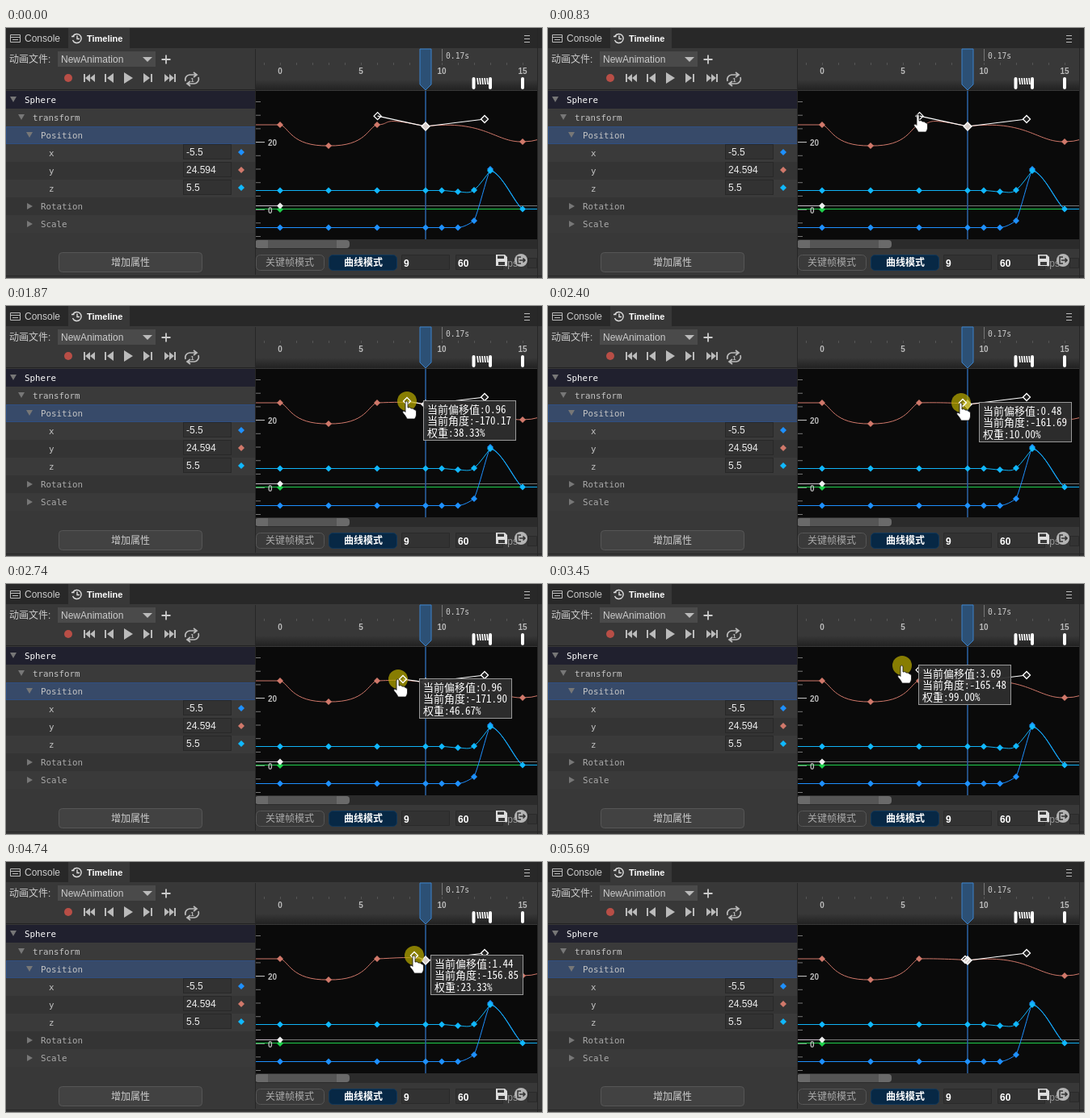
Recreate the animation shown at these times as an HTML page. Size 663 by 310 pixels, loop 6.02 s.

```html
<!DOCTYPE html>
<html lang="zh">
<head>
<meta charset="utf-8">
<title>Timeline</title>
<style>
  html, body { margin: 0; width: 100%; height: 100%; overflow: hidden; background: #383838; }
  svg { display: block; width: 663px; height: 310px; }
  text { font: 12px "Liberation Sans", "Noto Sans CJK SC", Arial, sans-serif; fill: #ccc; white-space: pre; }
  text.mid { text-anchor: middle; }
  text.value { fill: #eee; }
  text.bold { font-weight: bold; fill: #fff; }
  text.small { font-size: 10px; font-weight: bold; fill: #bbb; }
  text.label { font: 10.8px "DejaVu Sans Mono", monospace; }
  #tip text { font: 13px "Noto Sans Mono CJK SC", "Liberation Mono", monospace; fill: #fff; }
  .line { fill: none; }
</style>
</head>
<body>
<svg viewBox="0 0 663 310">
  <defs>
    <clipPath id="chart"><path d="M309 78H657V262H309z"/></clipPath>
    <linearGradient id="shade" x2="0" y2="1"><stop stop-color="#383838"/><stop offset="1" stop-color="#222"/></linearGradient>
  </defs>

  <!-- tabs -->
  <path d="M0 0H663V25H0z" fill="#282828"/>
  <path d="M77 0H153V26H77z" fill="#383838"/>
  <path d="M5.500 8.500h12v9h-12zM5.500 11.500h12M8 14.500h7" fill="none" stroke="#bbb"/>
  <text x="23" y="17">Console</text>
  <path d="M83 10a5.500 5.500 0 1 1-.5 5M81 10.500h3.500M88 9.500v4h3" fill="none" stroke="#ddd" stroke-width="1.400"/>
  <text class="bold" x="100" y="17" style="font-size:11px">Timeline</text>
  <path d="M641 9.500h7M641 13.500h7M641 17.500h7" stroke="#bbb"/>

  <!-- file picker and transport -->
  <text x="4" y="43">动画文件:</text>
  <path d="M64 29H185V48H64z" fill="#4a4a4a"/>
  <text x="68" y="43">NewAnimation</text>
  <path d="M169 36h12l-6 6z" fill="#bbb"/>
  <path d="M192.500 39h11M198 33.500v11" stroke="#ccc" stroke-width="1.800"/>
  <circle cx="77" cy="62" r="5" fill="#b84e46"/>
  <g fill="#bbb">
    <path id="skip" d="M96 57h2v10h-2zM104 57v10l-6-5zM110 57v10l-6-5z"/>
    <path id="step" d="M122 57h2v10h-2zM133 56v12l-8-6z"/>
    <path d="M146 55v14l11-7z"/>
    <use href="#step" transform="matrix(-1 0 0 1 303 0)"/>
    <use href="#skip" transform="matrix(-1 0 0 1 306 0)"/>
  </g>
  <path d="M222 66a6 6 0 0 1 5-8h8M238 61a6 6 0 0 1-5 8h-8M232 55l4 3-4 3M228 66l-4 3 4 3" fill="none" stroke="#bbb" stroke-width="1.700"/>
  <text class="small mid" x="230.500" y="67" style="font-size:8px">1</text>

  <g id="tree"></g>
  <path d="M0 76.500H309" stroke="#222"/>

  <!-- ruler -->
  <path d="M309 26H657V77H309z" fill="#383838"/>
  <path d="M309 64H657V77H309z" fill="url(#shade)"/>
  <g id="ruler"></g>
  <path d="M539.500 26v15" stroke="#777"/>
  <text class="label" x="544" y="38" style="font-size:9.700px">0.17s</text>

  <!-- curves -->
  <path d="M309 78H657V262H309z" fill="#0a0a0a"/>
  <g id="axis"></g>
  <g clip-path="url(#chart)">
    <path d="M309 220.500H657" stroke="#777"/>
    <path d="M309 220.500H339" stroke="#c8bcc8"/>
    <path d="M309 224.500H657" stroke="#1fd04c" stroke-width="1.200"/>
    <path class="line" stroke="#1e90ff" d="M309 247.500H559C566 247 573 243 579 239C586 222 593 190 599 175C616 184 630 218 639 224.500H657"/>
    <path class="line" stroke="#10b4f8" d="M309 201.500H539C546 201.500 552 203 559 203S573 206 579 201C587 194 593 184 599 177C614 180 628 217 639 224.500H657"/>
    <path id="red" class="line" stroke="#d0786a"/>
    <path d="M519 78V262" stroke="#2a5f9e" stroke-width="1.600"/>
    <g id="keys"></g>
    <path id="tangent" fill="none" stroke="#fff" stroke-width="1.200"/>
    <g id="handles"></g>
  </g>
  <text class="small" x="324" y="146">20</text>
  <text class="small" x="324" y="230">0</text>
  <path d="M512 26h14v44l-7 7-7-7z" fill="#2c5075" stroke="#3a82cc"/>

  <!-- footer -->
  <path d="M309 262H657V274H309z" fill="#2b2b2b"/>
  <rect x="308" y="263" width="117" height="10" rx="4" fill="#6a6a6a"/>
  <path d="M324 263H409V273H324z" fill="#555"/>
  <g stroke="#565656">
    <rect x="65.500" y="278.500" width="177" height="24" rx="4" fill="#424242"/>
    <rect x="309.500" y="281.500" width="84" height="19" rx="5" fill="#3a3a3a"/>
    <rect x="399.500" y="281.500" width="84" height="19" rx="5" fill="#072845" stroke="#12385a"/>
    <path d="M489.500 281.500h59v18h-59zM556.500 281.500h58v18h-58z" fill="#323232" stroke="#2a2a2a"/>
  </g>
  <text class="mid" x="154" y="294.500">增加属性</text>
  <text class="mid" x="351" y="295" style="fill:#aaa">关键帧模式</text>
  <text class="mid bold" x="442" y="295">曲线模式</text>
  <text class="bold" x="492" y="296">9</text>
  <text class="bold" x="559" y="296">60</text>
  <text x="617" y="296" style="fill:#999">fps</text>
  <path d="M645.500 285.500h11v12h-11z" fill="#333" stroke="#2a2a2a"/>
  <path d="M606 281h11l3 3v11h-14z" fill="#ddd"/>
  <path d="M608 282.500h8v3.500h-8zM609 290h8v4h-8z" fill="#383838"/>
  <circle cx="637" cy="288" r="8" fill="#b4b4b4"/>
  <path d="M637 284h-4v8h4M635 288h7M639.500 285.500l2.500 2.500-2.500 2.500" fill="none" stroke="#333" stroke-width="1.500"/>
  <path d="M308.500 26V306M657.500 0V310M0 307.500H663" stroke="#262626"/>

  <!-- pointer and value tip -->
  <circle id="press" r="12" fill="#b8aa00" fill-opacity=".72"/>
  <path id="grip" fill="none" stroke="#fff" stroke-width="1.300"/>
  <g id="tip">
    <rect x=".5" y=".5" width="114" height="49" fill="#2e2e2e" fill-opacity=".94" stroke="#999"/>
    <text x="5" y="15.500"></text><text x="5" y="30"></text><text x="5" y="45"></text>
  </g>
  <path id="hand" d="M-2 2q0-2 1.500-2t1.500 2v6q3-1 4 1 3-.5 4 1.500 2.500 0 2.500 2.500v4q0 2-2 5H0q-1-3-5-7.500-1-2 1-2.500 1 0 2 1.500z" fill="#fff" stroke="#111" stroke-width=".8"/>
</svg>
<script>
const $ = id => document.getElementById(id);
const BLUE = '#1e90ff', SKY = '#10b8ff', RED = '#d0786a';
const LOOP = 6020, ENTER = 130, PRESS = 980, RELEASE = 5480, LEAVE = 5690;
const KEY = { x: 519, y: 121.9855 }, SPAN = 60, UNITS_PER_PX = 0.24;

const rhomb = (x, y, r) => `M${x - r} ${y}L${x} ${y - r}L${x + r} ${y}L${x} ${y + r}z`;
const diamond = (x, y, fill, r = 4, stroke = 'none') =>
  `<path d="${rhomb(x, y, r)}" fill="${fill}" stroke="${stroke}" stroke-width="1.3"/>`;
const rect = (x, y, w, h, fill, rx = 0) =>
  `<rect x="${x}" y="${y}" width="${w}" height="${h}" rx="${rx}" fill="${fill}"/>`;
const range = (n, fn) => Array.from({ length: n }, (_, i) => fn(i)).join('');

// Property tree: label, indent, arrow (1 open, 0 closed), value, key colour
const rows = [
  ['Sphere', 23, 1], ['transform', 33, 1], ['Position', 43, 1],
  ['x', 53, , '-5.5', BLUE], ['y', 53, , '24.594', RED], ['z', 53, , '5.5', SKY],
  ['Rotation', 43, 0], ['Scale', 43, 0]
];
$('tree').innerHTML = rows.map(([label, x, open, value, color], i) => {
  const y = 89 + 22 * i, ax = x - 14;
  const bg = i === 2 ? '#374a69' : i === 0 ? '#20202e' : i % 2 ? '#3a3a3a' : '#343434';
  const ink = i === 0 ? '#fff' : i > 5 ? '#aaa' : '#c4c4c4';
  let out = rect(0, y - 11, 309, 22, bg) +
    `<text class="label" x="${x}" y="${y + 4}" style="fill:${ink}">${label}</text>`;
  if (i === 2)
    out += `<rect x=".5" y="${y - 10.5}" width="308" height="21" fill="none" stroke="#2f4f82"/>`;
  if (open !== undefined)
    out += `<path d="${open ? `M${ax - 4} ${y - 4}h8l-4 7z` : `M${ax - 3} ${y - 4}v8l7-4z`}" fill="#777"/>`;
  if (value)
    out += `<rect x="219.5" y="${y - 10.5}" width="59" height="18" fill="#323232" stroke="#282828"/>` +
      `<text class="value" x="223" y="${y + 3}">${value}</text>` + diamond(291, y - 1, color);
  return out;
}).join('');

$('ruler').innerHTML =
  range(17, i => rect(319 + 20 * i, 43, 1, 3, '#555')) +
  range(4, i => `<text class="small mid" x="${339 + 100 * i}" y="57">${5 * i}</text>`) +
  range(5, i => `<path d="M${583 + 3 * i} 62l1 8" stroke="#fff" stroke-width="1.7"/>`) +
  [576.5, 597, 637].map(x => rect(x, 61, 4, 15, '#fff', 2)).join('');

$('axis').innerHTML = range(11, i =>
  rect(309, 91 + 16.7 * i, i % 5 === 3 ? 11 : 6, 1, i % 5 === 3 ? '#ccc' : '#777'));

const keyRow = (points, fill) => points.map(([x, y]) => diamond(x, y, fill)).join('');
const flat = (xs, y) => xs.map(x => [x, y]);
$('keys').innerHTML =
  keyRow([...flat([339, 399, 459, 519, 539, 559], 247.5), [579, 239], [599, 175]], BLUE) +
  keyRow([...flat([339, 399, 459, 519, 539], 201.5), [559, 203], [579, 201], [599, 177], [639, 224.5]], SKY) +
  keyRow([[339, 120], [399, 146], [459, 120], [639, 141]], RED) +
  diamond(339, 225, '#1fd04c') + diamond(339, 220.5, '#eee');
$('handles').innerHTML =
  diamond(519, 122, '#d8d0cc', 5, '#fff') + diamond(592, 113, '#222', 4.5, '#fff');

// Pointer moves: start ms, end ms, steps, x, y, offset of the dragged position
const moves = [
  [130, 690, 9, 461, 112], [760, 830, 2, 458, 107],
  [1310, 1520, 4, 469, 110], [1590, 1870, 5, 496, 118], [1940, 2140, 4, 513, 120],
  [2400, 2400, 1, 511, 120, 2], [2470, 2740, 5, 485, 118, 6], [2810, 2950, 3, 474, 114],
  [3020, 3450, 7, 438, 101], [3910, 4040, 3, 448, 101],
  [4240, 4240, 1, 466, 103, -7], [4310, 4520, 4, 496, 111],
  [4670, 4740, 2, 505, 116], [5140, 5210, 2, 516, 121], [5480, 5620, 3, 545, 275]
];
function pointerAt(t) {
  let p = [535, 214, 0];
  for (const [start, end, steps, x, y, lag = 0] of moves) {
    if (t < start) break;
    const done = Math.floor((t - start) / (end - start || 1) * (steps - 1) + 0.06) + 1;
    const k = Math.min(1, done / steps);
    p = [x, y, lag].map((v, i) => p[i] + (v - p[i]) * k);
  }
  return { x: p[0], y: p[1], dragX: Math.round(p[0] + p[2]), dragY: Math.round(p[1]) };
}

const show = (id, on) => $(id).setAttribute('visibility', on ? 'visible' : 'hidden');
const move = (id, x, y) => $(id).setAttribute('transform', `translate(${x} ${y})`);
const tipLines = $('tip').querySelectorAll('text');

function draw(t) {
  const p = pointerAt(t);
  const drag = t < PRESS ? { dragX: 459, dragY: 109 } : pointerAt(Math.min(t, RELEASE - 1));
  const pressed = t >= PRESS && t < RELEASE;
  const slope = (KEY.y - drag.dragY) / (KEY.x - drag.dragX);
  const dx = Math.min(KEY.x - drag.dragX, SPAN * 0.99), dy = slope * dx;
  const hx = KEY.x - dx, hy = KEY.y - dy;

  $('red').setAttribute('d', 'M309 120H339C350 122.5 352 147 399 146C446 147 448 122.5 459 120' +
    `C479 119.5 ${hx} ${hy} 519 122C592 113 605 142 639 141Q650 141 660 138`);
  $('tangent').setAttribute('d', `M${hx} ${hy}L519 122L592 113`);
  $('grip').setAttribute('d', rhomb(hx, hy, 4.5));

  show('hand', t >= ENTER && t < LEAVE);
  show('press', pressed);
  show('tip', pressed);
  move('hand', p.x, p.y);
  move('press', p.x, p.y);
  move('tip', drag.dragX + 20, drag.dragY - 1);
  tipLines[0].textContent = `当前偏移值:${(dy * UNITS_PER_PX).toFixed(2)}`;
  tipLines[1].textContent = `当前角度:${(Math.atan(slope) * 180 / Math.PI - 180).toFixed(2)}`;
  tipLines[2].textContent = `权重:${(dx / SPAN * 100).toFixed(2)}%`;
}

const origin = performance.now();
function tick() {
  draw((performance.now() - origin) % LOOP);
  requestAnimationFrame(tick);
}
tick();
</script>
</body>
</html>
```
